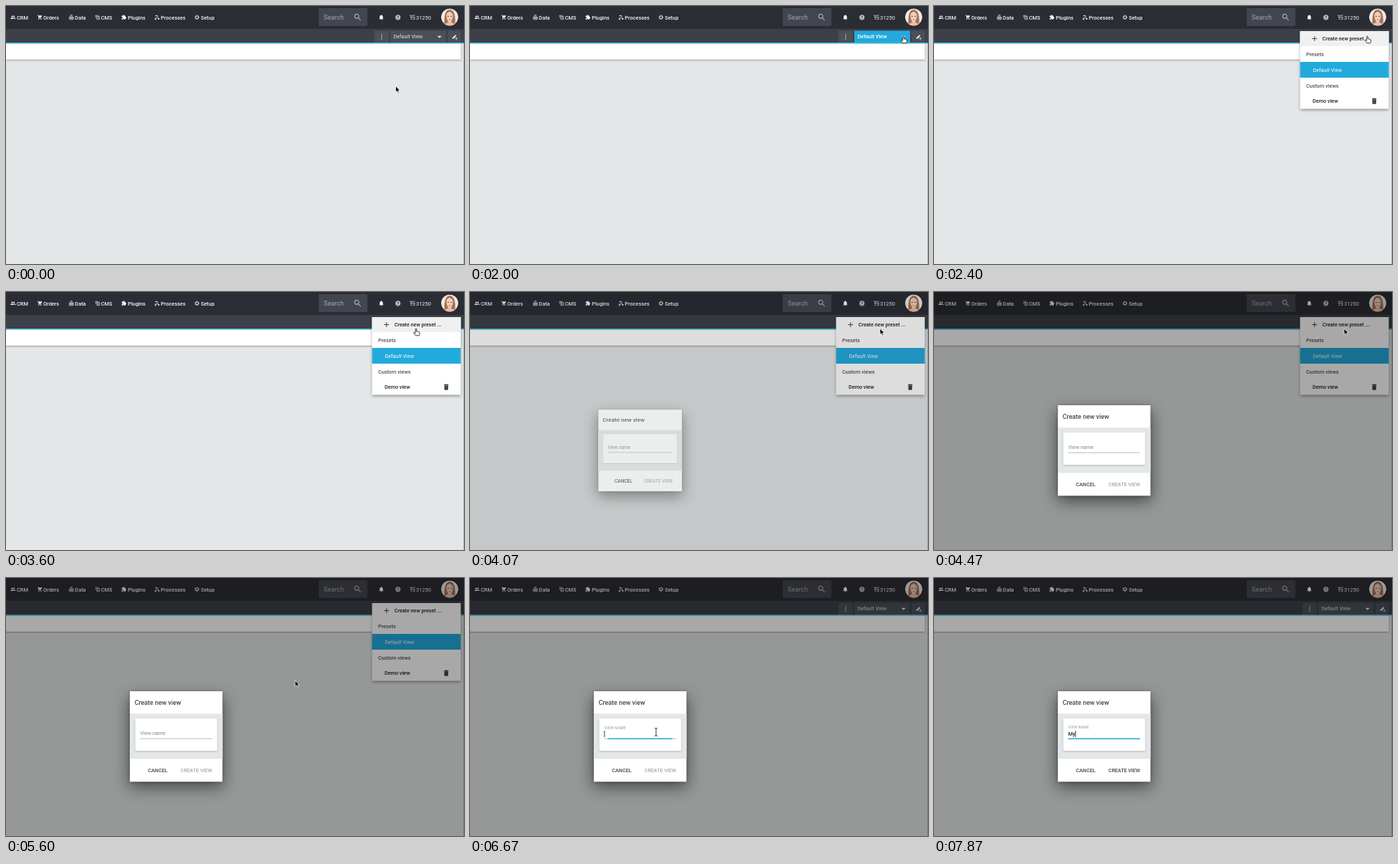
An HTML page that plays this animation: 640x360 px, repeating every 8000 ms.

```html
<!DOCTYPE html>
<html lang="en">
<head>
<meta charset="utf-8">
<title>Create a view</title>
<style>
html, body { margin: 0; width: 100%; height: 100%; overflow: hidden; background: #e3e7e7; }
svg { display: block; width: 100vw; height: 100vh; }
text { font-family: Roboto, sans-serif; font-size: 7.25px; white-space: pre; }
.m { font-weight: 500; }
.line { fill: none; stroke: currentColor; }
</style>
</head>
<body>
<svg viewBox="0 0 640 360">
  <defs>
    <filter id="soft" x="-50%" y="-50%" width="200%" height="200%"><feGaussianBlur stdDeviation="11"/></filter>
    <filter id="small" x="-20%" y="-20%" width="140%" height="140%"><feGaussianBlur stdDeviation="2"/></filter>
    <filter id="tiny" x="-20%" y="-50%" width="140%" height="200%"><feGaussianBlur stdDeviation=".8"/></filter>
    <clipPath id="face"><circle cx="620" cy="15.5" r="12"/></clipPath>
  </defs>

  <rect width="640" height="360" fill="#e3e7e7"/>
  <rect y="54" width="635.5" height="21.7" fill="#8d9292" filter="url(#tiny)"/>
  <rect y="52" width="635.5" height="22.8" fill="#fff"/>
  <rect x="639" y="52" width="1" height="308" fill="#b4b8b9"/>
  <rect y="32" width="640" height="20" fill="#3d4049"/>
  <rect y="51" width="640" height="1.6" fill="#3fb9d3"/>
  <rect width="640" height="32" fill="#2a2d34"/>

  <g id="nav" fill="#f4f5f6" color="#f4f5f6"></g>

  <rect x="437" y="3" width="68" height="25" rx="1" fill="#42464e"/>
  <text x="444" y="19" style="font-size:9.1px" fill="#a4a7ad">Search</text>
  <path transform="translate(485 9.2) scale(.54)" fill="#b3b6bb" d="M15.5 14h-.8l-.3-.3a6.5 6.5 0 1 0-.7.7l.3.3v.8l5 5 1.5-1.5zm-6 0a4.5 4.5 0 1 1 0-9 4.5 4.5 0 0 1 0 9z"/>
  <path transform="translate(520 11.3) scale(.37)" fill="#fff" d="M12 22a2 2 0 0 0 2-2h-4a2 2 0 0 0 2 2zm6-6v-5c0-3.1-1.6-5.6-4.5-6.3V4a1.5 1.5 0 0 0-3 0v.7C7.6 5.4 6 7.9 6 11v5l-2 2v1h16v-1z"/>
  <circle cx="547.7" cy="15.8" r="3.6" fill="#b9bbbf"/>
  <text class="m" x="547.7" y="18" text-anchor="middle" style="font-size:6px" fill="#2a2d34">?</text>
  <path class="line" color="#c9cbcf" d="M564 13.2h2.3M567 13.2h4.6M565.5 15.6h6M566 18.4h1.6M568.7 18.4h2.6M566 13v5.4M570.8 15.6v3" stroke-width=".9"/>
  <text x="573" y="18.5" style="font-size:7.45px" fill="#f0f1f2">31250</text>

  <g clip-path="url(#face)">
    <circle cx="620" cy="15.5" r="12" fill="#ece9e6"/>
    <path d="M613 28C612 20 612 5.5 620 5.3S628.500 20 627 28Z" fill="#a56f55"/>
    <path d="M611 28c1-4 5-4 6.500-5v-3h5v3c2 1 6 1 7 5z" fill="#e7bda6"/>
    <path d="M615.400 13c0-7 9.200-7 9.200 0 0 5-2 8.500-4.600 8.500s-4.600-3.500-4.600-8.500z" fill="#f3cdb8"/>
    <path d="M614.800 15c.2-5 3-6.500 5.500-7 2.500 1 4.500 3 4.900 7 1-6-1-9.500-5.200-9.500s-6.300 4-5.200 9.500z" fill="#a56f55"/>
    <path d="M617 14.400h1.800M621.300 14.400h1.800" stroke="#4d3b38" stroke-width="1"/>
    <path d="M618.600 18.600q1.400 1 2.800 0" stroke="#c0605e" stroke-width=".8" fill="none"/>
  </g>

  <g fill="#4b4f58">
    <rect x="515" y="34.500" width="20" height="16.500"/>
    <rect id="select" x="537" y="34.500" width="78" height="16.500"/>
    <rect x="617" y="34.500" width="18.500" height="16.500"/>
  </g>
  <g fill="#e4e5e8">
    <circle cx="525" cy="40.300" r=".8"/><circle cx="525" cy="43" r=".8"/><circle cx="525" cy="45.700" r=".8"/>
    <text id="choice" x="541.500" y="45.400">Default View</text>
    <path d="M602.800 41.700h6l-3 3z"/>
    <path d="M623.800 45.800v-1.600l4-4 1.600 1.600-4 4z"/>
    <path d="M627.800 45h1v-1h1v1h1v1h-1v1h-1v-1h-1z" opacity=".8"/>
  </g>

  <g id="menu">
    <rect x="512" y="37" width="123" height="108" fill="#000" opacity=".4" filter="url(#small)"/>
    <rect x="511.500" y="35" width="124" height="108.500" fill="#fff"/>
    <rect id="hover" x="511.500" y="35" width="124" height="21" fill="#f0f0f0"/>
    <rect x="511.500" y="78" width="124" height="22" fill="#23aadd"/>
    <path d="M528.300 45.500h7M531.800 42v7" stroke="#333" stroke-width=".9"/>
    <text class="m" x="542.800" y="48" style="font-size:7.15px" fill="#222">Create new preset ...</text>
    <text class="m" x="520" y="69.800" fill="#555">Presets</text>
    <text x="529.500" y="91.500" fill="#fff">Default View</text>
    <text class="m" x="520" y="113.500" fill="#555">Custom views</text>
    <text class="m" x="529" y="135.200" fill="#222">Demo view</text>
    <path transform="translate(609.800 127.200) scale(.45)" fill="#444" d="M6 19c0 1.100.9 2 2 2h8c1.100 0 2-.9 2-2V7H6zM19 4h-3.500l-1-1h-5l-1 1H5v2h14z"/>
  </g>

  <rect id="dim" width="640" height="360"/>

  <g id="dialog">
    <rect x="172" y="166" width="131.500" height="126" fill="#000" opacity=".52" filter="url(#soft)"/>
    <rect x="173" y="159" width="129.500" height="126" fill="#000" opacity=".3" filter="url(#small)"/>
    <rect x="173" y="158" width="129.500" height="126.300" fill="#fff"/>
    <rect x="173" y="189.300" width="129.500" height="63" fill="#e3e7e7"/>
    <rect x="180.500" y="197" width="114.500" height="45" fill="#777" opacity=".6" filter="url(#tiny)"/>
    <rect x="180.500" y="196" width="114.500" height="45.300" fill="#fff"/>
    <text class="m" x="179.700" y="176.600" style="font-size:8.900px" fill="#42464e">Create new view</text>
    <text id="label" x="187.500"></text>
    <text id="typed" class="m" x="187.500" y="220" fill="#222"></text>
    <rect x="187.500" y="223.800" width="100.500" height=".8" fill="#a9a9a9"/>
    <rect id="bar" y="223.600" height="1.500" fill="#23aadd"/>
    <rect id="caret" y="213" width=".9" height="9" fill="#222"/>
    <text class="m" x="198.200" y="271.300" fill="#42464e">CANCEL</text>
    <text id="create" class="m" x="243.800" y="271.300" style="font-size:7.100px">CREATE VIEW</text>
  </g>

  <g id="arrow" stroke="#fff" stroke-width=".7"><path d="M0 0V8.300L1.900 6.600 3.200 9.600 4.700 9 3.400 6.100H6Z"/></g>
  <g id="hand" stroke="#111" stroke-width=".8" stroke-linejoin="round"><path fill="#fff" d="M-.8.8C-.8-.2.8-.2.8.8V4l1.200-.2.3.5 1.200-.1.300.6c1-.2 1.200.3 1.200 1V7.200L4.200 9.800H-.5L-3.200 6.300c-.5-.8.4-1.500 1.100-.9L-.8 6.500z"/></g>
  <path id="beam" fill="none" stroke="#222" stroke-width=".9" d="M-2-5.500Q0-5.500 0-4.300Q0-5.500 2-5.500M0-4.500V4.500M-2 5.500Q0 5.500 0 4.300Q0 5.500 2 5.500"/>
</svg>
<script>
const $ = id => document.getElementById(id);
const set = (id, attrs) => { for (const k in attrs) $(id).setAttribute(k, attrs[k]); };
const show = (id, on) => $(id).setAttribute('visibility', on ? 'visible' : 'hidden');
const clamp = v => Math.max(0, Math.min(1, v));
const part = (t, from, to) => clamp((t - from) / (to - from));
const mix = (a, b, p) => a + (b - a) * p;

// CSS-style cubic-bezier easing, solved by bisection
function bezier(x1, y1, x2, y2) {
  const at = (a, b, s) => 3 * a * s * (1 - s) ** 2 + 3 * b * s * s * (1 - s) + s ** 3;
  return x => {
    let lo = 0, hi = 1;
    for (let i = 0; i < 20; i++) {
      const mid = (lo + hi) / 2;
      if (at(x1, x2, mid) < x) lo = mid; else hi = mid;
    }
    return at(y1, y2, (lo + hi) / 2);
  };
}
const swift = bezier(.25, .8, .25, 1);
const decel = bezier(0, 0, .2, 1);

// Icons are drawn on a 24-unit grid
const nav = [
  [6, 15, 'CRM', '<path d="M1 19v-2c0-3 4-4 7-4s7 1 7 4v2zM16 13c3 0 7 1 7 4v2h-6v-2c0-2-1-3-2-4z"/><circle cx="8" cy="8" r="3.500"/><circle cx="16" cy="8" r="3.500"/>'],
  [43.500, 52, 'Orders', '<circle cx="7" cy="20" r="2"/><circle cx="17" cy="20" r="2"/><path d="M1 2v2h2l3.600 7.600-1.400 2.400c-.7 1.300.3 3 1.800 3h12v-2H7.400l1.100-2H16c.7 0 1.400-.4 1.700-1l3.600-6.500A1 1 0 0 0 20.400 4H5.200L4.300 2z"/>'],
  [87.500, 96.300, 'Data', '<path class="line" stroke-width="2" d="M3 10h18v11H3zM6 6h12M8 2h8M3 15h18M9 10v11M15 10v11"/>'],
  [124, 132.800, 'CMS', '<path class="line" stroke-width="2" d="M5 15V4h11M9 8h12v13H9zM2 4h3M12 12h6M12 16h6"/>'],
  [161, 170.200, 'Plugins', '<path d="M20.500 11H19V7c0-1.100-.9-2-2-2h-4V3.500a2.500 2.500 0 0 0-5 0V5H4c-1.100 0-2 .9-2 2v3.800h1.500a2.700 2.700 0 0 1 0 5.400H2V20c0 1.100.9 2 2 2h3.800v-1.500a2.700 2.700 0 0 1 5.400 0V22H17c1.100 0 2-.9 2-2v-4h1.500a2.500 2.500 0 0 0 0-5z"/>'],
  [207.500, 216.200, 'Processes', '<path class="line" stroke-width="2.200" d="M8 5h6v8M4 20v-5h12v4"/><circle cx="7" cy="5" r="3"/><circle cx="4" cy="20" r="3"/><circle cx="19" cy="19" r="3"/>'],
  [263, 272.200, 'Setup', '<circle class="line" cx="12" cy="12" r="6" stroke-width="3"/><circle class="line" cx="12" cy="12" r="8.800" stroke-width="3" stroke-dasharray="4.600"/>']
];
$('nav').innerHTML = nav.map(([x, tx, name, icon]) =>
  `<g transform="translate(${x} 12) scale(.32)">${icon}</g><text class="m" x="${tx}" y="18.500" style="font-size:7.400px">${name}</text>`).join('');

// Pointer tip: time, x, y
const path = [
  [1000, 544.5, 111.8], [1867, 608, 46.5], [1930, 605.5, 42], [2933, 605.5, 42],
  [3600, 573, 51], [5067, 573, 51], [5600, 404, 143], [5930, 285, 215],
  [6200, 260, 215]
];
function pointer(t) {
  let i = 0;
  while (i < path.length - 2 && t > path[i + 1][0]) i++;
  const [a, b] = [path[i], path[i + 1]], p = part(t, a[0], b[0]);
  return [mix(a[1], b[1], p), mix(a[2], b[2], p)];
}
const zoom = (cx, cy, s) => `translate(${cx} ${cy}) scale(${s}) translate(${-cx} ${-cy})`;

function draw(t) {
  const over = t >= 1800 && t < 2260;
  set('select', { fill: over ? '#23aadd' : '#4b4f58' });
  set('choice', { fill: over ? '#fff' : '#e4e5e8', 'font-weight': over ? 500 : 400 });

  const open = decel(part(t, 2230, 2390));
  set('menu', { opacity: open * (1 - part(t, 6490, 6620)), transform: zoom(635, 35, mix(.8, 1, open)) });
  show('menu', t > 2230 && t < 6620);
  show('hover', t < 4030);

  set('dim', { 'fill-opacity': .34 * swift(part(t, 4016, 4430)) });
  const pop = decel(part(t, 4018, 4168));
  set('dialog', { opacity: pop, transform: zoom(237.75, 221, mix(.7, 1, pop)) });
  show('dialog', t > 4018);

  const focused = t >= 6510;
  const lift = swift(part(t, 6490, 6920));
  set('label', { y: mix(219, 210.2, lift), fill: focused ? '#999' : '#858585' });
  $('label').style.fontSize = mix(7.2, 5.4, lift) + 'px';
  $('label').textContent = focused ? 'VIEW NAME' : 'View name';
  set('bar', { x: 237.75 - 50.25 * lift, width: 100.5 * lift });

  $('typed').textContent = 'My'.slice(0, (t >= 7725) + (t >= 7860));
  set('caret', { x: 187.5 + $('typed').getComputedTextLength() });
  show('caret', focused && !(t >= 7060 && t < 7525));
  set('create', { fill: t >= 7725 ? '#42464e' : '#a9a9a9' });

  const [x, y] = pointer(t);
  const kind = t >= 7725 ? '' : t >= 5925 ? 'beam' : t >= 1925 && t < 4030 ? 'hand' : 'arrow';
  for (const id of ['arrow', 'hand', 'beam']) {
    show(id, id === kind);
    set(id, { transform: `translate(${x} ${y})` });
  }
}

const STEP = 1000 / 15, LOOP = 8000;
const start = performance.now();
function tick() {
  const t = (performance.now() - start) % LOOP;
  draw(Math.floor((t + 4) / STEP) * STEP % LOOP);
  requestAnimationFrame(tick);
}
tick();
</script>
</body>
</html>
```
